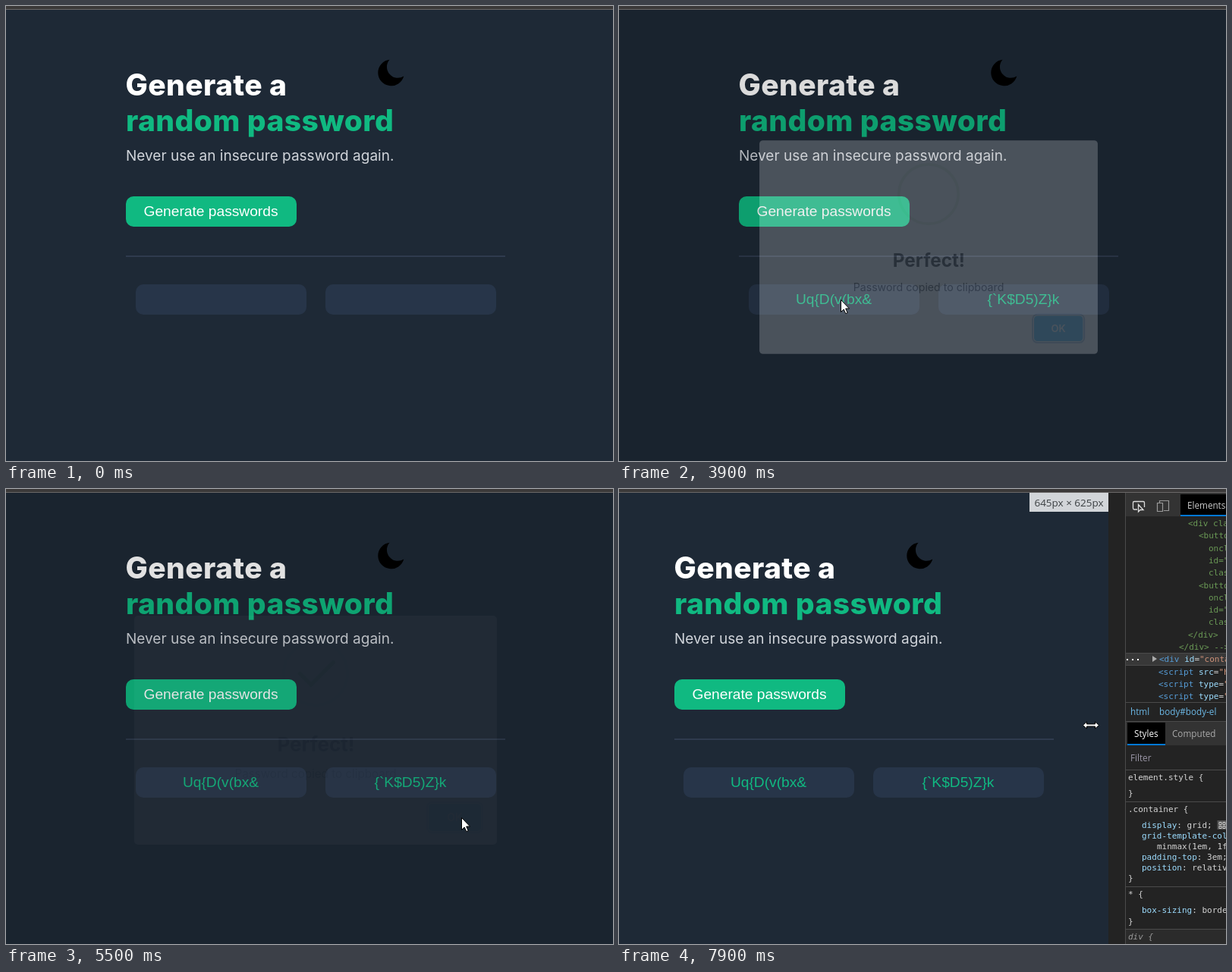
These frames come from a looping animation (800x600 px, 8 s). An HTML page:

```html
<!DOCTYPE html>
<html lang="en">
<head>
<meta charset="utf-8">
<title>Random password</title>
<style>
  html, body { margin: 0; width: 100%; height: 100%; overflow: hidden; background: #1e2936; }
  svg { display: block; width: 800px; height: 600px; font-family: Inter, sans-serif; }
  .head { font-size: 39px; font-weight: 800; letter-spacing: .01em; }
  .arial { font: 19.2px "Liberation Sans", Arial, sans-serif; }
  .mid { text-anchor: middle; }
  .code { font: 11px "DejaVu Sans Mono", monospace; fill: #d4d4d4; }
  .ui { font: 11.7px "Open Sans", sans-serif; fill: #ccc; }
  .tag { fill: #569cd6; }
  .attr { fill: #9cdcfe; }
  .str { fill: #ce9178; }
  .note { fill: #6a9955; }
  .line { stroke: #4a4a4a; }
  .pointer { fill: #fff; stroke: #000; stroke-linejoin: round; }
</style>
</head>
<body>
<svg viewBox="0 0 800 600">
  <rect width="800" height="600" fill="#1e2936"/>

  <g id="page">
    <text class="head" x="-.5" y="118" fill="#fff">Generate a</text>
    <text class="head" x="0" y="165" fill="#10b981">random password</text>
    <text x="0" y="204" font-size="19" fill="#d1d5db">Never use an insecure password again.</text>
    <rect y="251" width="225" height="40" rx="10" fill="#10b981"/>
    <text class="arial mid" x="112" y="277" fill="#fff">Generate passwords</text>
    <rect y="329" width="500" height="2" fill="#2f3b4e"/>
  </g>
  <g id="boxes" class="arial mid" fill="#10b981">
    <rect y="367" width="225" height="40" rx="10" fill="#273549"/>
    <rect x="250" y="367" width="225" height="40" rx="10" fill="#273549"/>
    <text id="first" x="112" y="393"></text>
    <text id="second" x="362" y="393"></text>
  </g>
  <path id="moon" d="M15.5 .8A17.3 17.3 0 1 0 34.3 22.5A14.5 14.5 0 0 1 15.5 .8Z"/>

  <g id="overlay">
    <rect width="800" height="600" opacity=".4"/>
    <g id="modal">
      <rect x="169" y="167" width="478" height="302" rx="5" fill="#fff"/>
      <g transform="translate(368 203)">
        <path id="arc" fill="none" stroke="#a5dc86" stroke-width="4"/>
        <circle cx="40" cy="40" r="42" fill="none" stroke="#a5dc86" stroke-opacity=".2" stroke-width="4"/>
        <rect id="tip" height="5" rx="2" fill="#a5dc86"/>
        <rect id="stem" height="5" rx="2" fill="#a5dc86"/>
      </g>
      <text class="mid" x="408.5" y="346" font-size="26" font-weight="700" fill="#595959">Perfect!</text>
      <text class="mid" x="408" y="380.5" font-size="15.2" fill="#6b6b6b">Password copied to clipboard</text>
      <rect x="554" y="412" width="75" height="42" rx="8" fill="#2b72a5" opacity=".29"/>
      <rect x="556" y="414" width="71" height="38" rx="6" fill="#fff"/>
      <rect id="ok" x="557" y="415" width="69" height="36" rx="5"/>
      <text class="mid" x="591.5" y="438" font-size="14" font-weight="600" fill="#fff">OK</text>
    </g>
  </g>

  <g id="tools">
    <rect id="gap" width="800" height="600" fill="#232323"/>
    <g id="panel">
      <g id="tree" class="code"></g>
      <path d="M667 5H1000V36H667Z" fill="#333"/>
      <rect x="740" y="7" width="80" height="29" fill="#000"/>
      <rect x="740" y="34" width="80" height="2" fill="#0078d4"/>
      <text class="ui" x="749" y="26">Elements</text>
      <path d="M683 27H679Q677.500 27 677.500 25V18Q677.500 16.500 679 16.500H691Q692.500 16.500 692.500 18V24M684.500 20.500V30L687 27.500H691Z" fill="none" stroke="#ddd" stroke-width="1.3"/>
      <path d="M712.500 18V15.500H724.500V28.500H718M709.500 18.500H716.500V29.500H709.500Z" fill="none" stroke="#999" stroke-width="1.2"/>

      <rect x="667" y="282" width="333" height="318" fill="#232323"/>
      <rect x="667" y="307" width="333" height="31" fill="#333"/>
      <rect x="670" y="308" width="50" height="30" fill="#000"/>
      <rect x="670" y="336" width="50" height="2" fill="#0078d4"/>
      <path class="line" d="M667 281.500H1000M667 306.500H1000M667 370.500H1000M667 412.500H1000"/>
      <g class="ui">
        <text x="674" y="298" fill="#6cb8e6">html</text>
        <text x="712" y="298" fill="#6cb8e6">body#body-el</text>
        <text x="679" y="327" fill="#fff">Styles</text>
        <text x="729" y="327" fill="#aaa">Computed</text>
        <text x="674" y="359" fill="#9a96a6">Filter</text>
      </g>
      <g class="code">
        <text x="671" y="384">element.style {</text>
        <text x="671" y="405">}</text>
        <text x="671" y="426">.container {</text>
        <text x="689" y="447"><tspan class="attr">display</tspan>: grid;</text>
        <path d="M788.500 437H800V449H788.500Z" fill="#555"/>
        <path d="M791 439.500h3v3h-3zM796 439.500h3v3h-3zM791 444.500h3v3h-3zM796 444.500h3v3h-3z" fill="none" stroke="#ccc"/>
        <text x="689" y="461" class="attr">grid-template-columns:</text>
        <text x="709" y="475">minmax(1em, 1fr)</text>
        <text x="689" y="489"><tspan class="attr">padding-top</tspan>: 3em;</text>
        <text x="689" y="503"><tspan class="attr">position</tspan>: relative;</text>
        <g id="rules">
          <text x="671" y="517">}</text>
          <text x="671" y="538">* {</text>
          <text x="689" y="559"><tspan class="attr">box-sizing</tspan>: border-box;</text>
          <text x="671" y="574">}</text>
          <rect x="667" y="581" width="333" height="30" fill="#2b2b2b"/>
          <path class="line" d="M667 524.500H1000M667 580.500H1000"/>
          <text x="671" y="594" fill="#999" font-style="italic">div {</text>
        </g>
      </g>
      <path class="line" d="M667.500 5V600"/>
    </g>
    <g id="label">
      <rect x="-104" y="5" width="104" height="25" fill="#d2d5d9"/>
      <text id="size" class="mid" x="-52" y="23" font-size="13.5" style="font-family:'Open Sans',sans-serif" fill="#3c4043"></text>
    </g>
  </g>

  <rect width="800" height="4" fill="#3b3939"/>
  <rect y="4" width="800" height="1" fill="#6a6868"/>

  <path id="cursor" class="pointer"/>
</svg>

<script>
const $ = id => document.getElementById(id);
const set = (id, attrs) => {
  for (const name in attrs) $(id).setAttribute(name, attrs[name]);
};
const move = (id, x, y = 0) => set(id, { transform: `translate(${x} ${y})` });
const clamp = x => Math.min(1, Math.max(0, x));

// CSS-style cubic-bezier timing
const bezier = (x1, y1, x2, y2) => x => {
  const at = (s, a, b) => 3 * (1 - s) ** 2 * s * a + 3 * (1 - s) * s * s * b + s ** 3;
  let low = 0, high = 1;
  x = clamp(x);
  if (x === 0 || x === 1) return x;
  for (let i = 0; i < 24; i++) {
    const s = (low + high) / 2;
    if (at(s, x1, x2) < x) low = s; else high = s;
  }
  return at(low, y1, y2);
};
const ease = bezier(.25, .1, .25, 1);
const easeIn = bezier(.42, 0, 1, 1);

// Interpolates rows of [time, ...values]
function track(t, keys, timing = x => x) {
  const next = keys.findIndex(key => key[0] > t);
  if (next === 0) return keys[0].slice(1);
  if (next < 0) return keys[keys.length - 1].slice(1);
  const a = keys[next - 1], b = keys[next];
  const k = timing((t - a[0]) / (b[0] - a[0]));
  return a.slice(1).map((v, i) => v + (b[i + 1] - v) * k);
}

const passwords = [
  [2700, "Uq{D(v(bx&", "{`K$D5)Z}k"],
  [2300, "Mz4(kT^a.8", "B}c6y!d-e2"],
  [1600, "h7]Wf;2x!s", "r3Kp[e?t9/"],
  [0, "", ""]
];
const cursorPath = [
  [200, 89, 13], [300, 150, 78], [400, 205, 145], [500, 250, 210], [600, 280, 255], [700, 290, 271],
  [2900, 290, 271], [3000, 291, 272], [3100, 291, 272], [3200, 294, 285], [3400, 301, 345], [3600, 292, 387],
  [4100, 292, 387], [4300, 333, 330], [4400, 333, 330], [4500, 345, 290], [4700, 440, 219], [4900, 565, 370],
  [5000, 600, 425], [5100, 606, 440], [5200, 600, 433], [5700, 600, 433], [6300, 800, 320]
];
// time, page width, panel edge, resize cursor x
const drag = [
  [7000, 800, 801, 790], [7100, 787, 788, 778], [7300, 770, 771, 765], [7400, 770, 771, 765],
  [7500, 757, 760, 747], [7600, 738, 744, 724], [7700, 712, 724, 694], [7800, 680, 698, 659], [7900, 645, 667, 622]
];
const shapes = {
  arrow: "M.5 .5V16.500L4.200 13L6.800 18.700L9.200 17.600L6.700 12H11.500Z",
  hand: "M-1.500 13V1.500a1.500 1.500 0 0 1 3 0V8l9 1.800q1.800 .6 1.500 2.500l-.7 5q-.5 2-1.800 4.200h-8q-2.500-3.500-6.500-7.500q-1.200-1.800 .5-2.500q1.500-.3 2.500 1.500z",
  resize: "M-10.500 0L-5.500-4.500V-1.500H5.500V-4.500L10.500 0L5.500 4.500V1.500H-5.500V4.500Z"
};

const button = [[764, "&lt;button"], [777, "onclick"], [777, 'id="'], [777, "class"]];
const comment = [[750, "&lt;div class"], ...button, ...button, [750, "&lt;/div&gt;"], [738, "&lt;/div&gt; --&gt;"]];
const element = (tag, attr, value) =>
  `<tspan class="tag">&lt;${tag}</tspan> <tspan class="attr">${attr}</tspan>=<tspan class="str">"${value}</tspan>`;
const rows = [
  ...comment.map(([x, text]) => [x, `<tspan class="note">${text}</tspan>`]),
  [712, element("div", "id", "container")],
  [711, element("script", "src", "helper")],
  [711, element("script", "type", "module")],
  [711, element("script", "type", "module")]
];
$("tree").innerHTML =
  `<rect x="667" y="217" width="333" height="16" fill="#383838"/>
   <path class="line" d="M667 216.500H1000M667 232.500H1000"/>
   <path d="M703 220V228L709 224Z" fill="#aaa"/>
   <path d="M669 224h2v2h-2zM676 224h2v2h-2zM683 224h2v2h-2z" fill="#fff"/>` +
  rows.map(([x, text], i) => `<text x="${x}" y="${49 + 16.3 * i}">${text}</text>`).join("");

function drawPage(t, width) {
  const left = (width - 500) / 2;
  move("page", Math.round(left));
  move("boxes", Math.round(left + 12.5));
  move("moon", Math.round(.65 * width - 40.25), 70);
  const [, first, second] = passwords.find(row => t >= row[0]);
  $("first").textContent = first;
  $("second").textContent = second;
}

function drawModal(t) {
  const visible = t >= 3900 && t < 5800;
  set("overlay", { display: visible ? "inline" : "none" });
  if (!visible) return;

  const u = Math.min(t - 3900, 420);
  const age = 67 + 1.05 * u + .0017 * u * u;
  const closing = t >= 5400;
  const faded = Math.min(t - 5374, 226);
  const fade = span => closing ? 1 - ease(faded / span) : ease(age / span);
  const [scale] = track(age, [[3, .5], [135, 1.05], [240, .95], [300, 1]], ease);
  set("overlay", { opacity: fade(300) });
  set("modal", { opacity: fade(200), transform: `translate(408 318) scale(${scale}) translate(-408 -318)` });

  const turn = 360 * easeIn((age - 212.5) / 297.5);
  const point = degrees => {
    const a = degrees * Math.PI / 180;
    return `${40 + 42 * Math.cos(a)} ${40 + 42 * Math.sin(a)}`;
  };
  const from = point(62 - Math.min(turn, 180)), to = point(62 - Math.max(turn - 180, 0));
  set("arc", { d: turn > 0 && turn < 360 ? `M${from}A42 42 0 0 1 ${to}` : "" });

  const bar = (id, width, x, y, angle) =>
    set(id, { width, x, y, transform: `rotate(${angle} ${x + width / 2} ${y + 2.5})` });
  const [tipWidth, tipX, tipY] =
    track(age, [[405, 0, 1, 19], [525, 50, -8, 37], [630, 17, 21, 48], [750, 25, 14, 45]], ease);
  const [stemWidth, right, stemY] =
    track(age, [[487, 0, 46, 54], [630, 55, 0, 35], [750, 47, 8, 38]], ease);
  bar("tip", tipWidth, tipX, tipY, 45);
  bar("stem", stemWidth, 80 - right - stemWidth, stemY, -45);
  set("ok", { fill: t >= 5000 && !closing ? "#78cbf2" : "#7cd1f9" });
}

function drawTools(visible, width, edge) {
  set("tools", { display: visible ? "inline" : "none" });
  const narrow = edge > 740;
  move("gap", width);
  move("panel", edge - 667);
  move("tree", 0, narrow ? 16.5 : 0);
  move("rules", 0, narrow ? 14 : 0);
  move("label", width);
  $("size").textContent = `${width}px × 625px`;
}

function drawCursor(t, resizing, resizeX) {
  const [x, y] = resizing ? [resizeX, t < 7500 ? 312.5 : 311.5] : track(t, cursorPath);
  const shape = resizing ? "resize" : t >= 4900 && t < 5500 ? "hand" : "arrow";
  const visible = resizing || t >= 200 && t < 6300;
  set("cursor", { d: shapes[shape], display: visible ? "inline" : "none" });
  move("cursor", x, y);
}

function draw(now) {
  const t = Math.floor(now % 8000 / 100) * 100;
  const resizing = t >= 7000;
  const [width, edge, resizeX] = resizing ? track(t, drag).map(Math.round) : [816, 816, 816];
  drawPage(t, width);
  drawModal(t);
  drawTools(resizing, width, edge);
  drawCursor(t, resizing, resizeX);
}

const start = performance.now();
function tick() {
  draw(performance.now() - start);
  requestAnimationFrame(tick);
}
tick();
</script>
</body>
</html>
```
